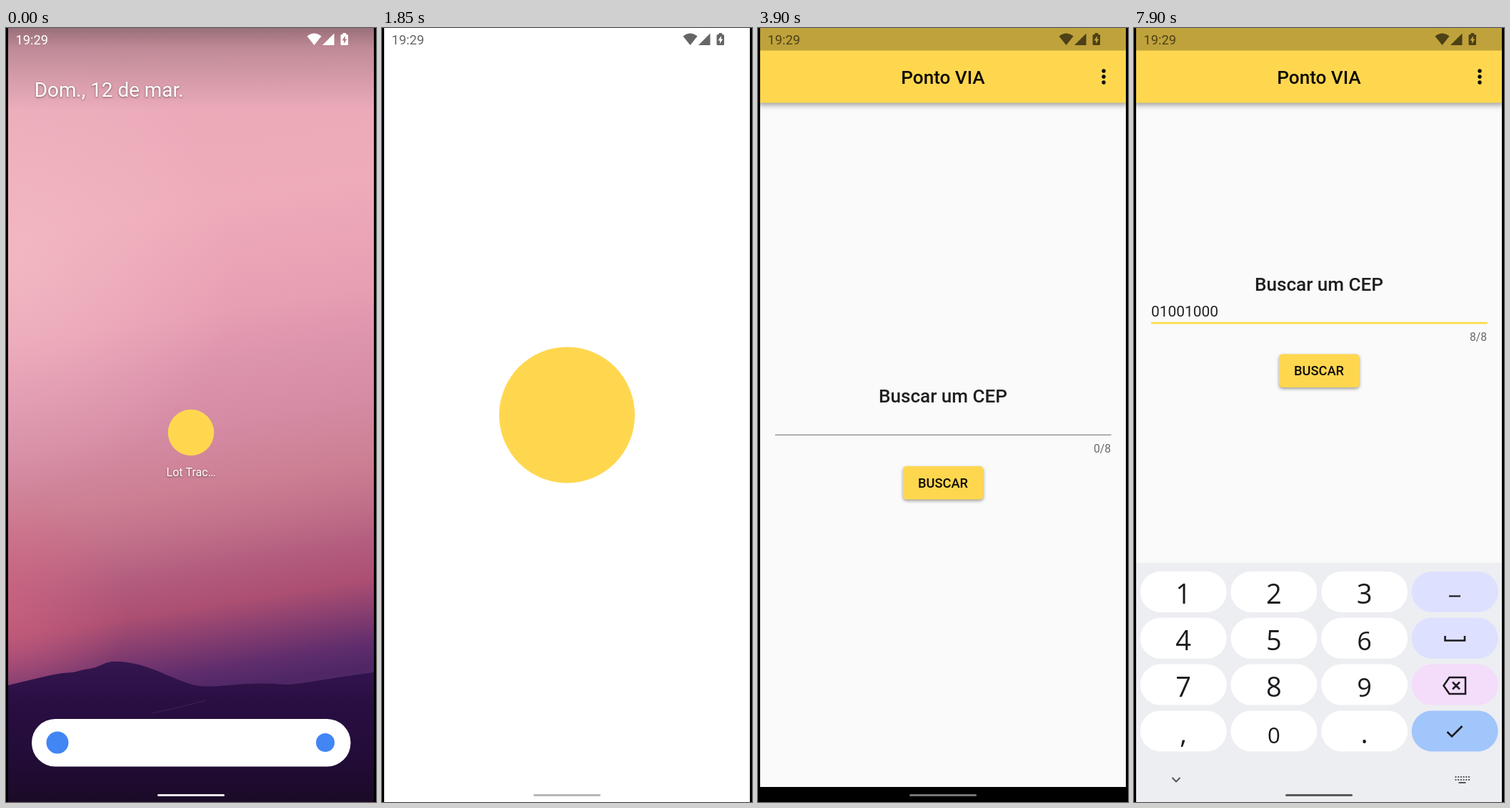
Write an HTML page with a canvas that moves like this. It is 518 px wide and 1081 px high and loops after 8 s.

```html
<!DOCTYPE html>
<html lang="pt">
<head>
<meta charset="utf-8">
<style>
html, body { margin: 0; width: 100%; height: 100%; overflow: hidden; background: #000; }
canvas { display: block; }
</style>
</head>
<body>
<canvas id="stage" width="518" height="1081"></canvas>
<script>
const c = document.getElementById('stage').getContext('2d');
const W = 518, H = 1081, CX = 259, LOOP = 8000;
const YELLOW = '#ffd74f', BLUE = '#4285f4', INK = '#1c1b1f';
const CODE = '01001000';
const KEY_TIMES = [5300, 5500, 6150, 6350, 6600, 7050, 7200, 7400];
const FOCUS = 4550;

const clamp = v => Math.max(0, Math.min(1, v));
const mix = (a, b, p) => a + (b - a) * p;
const span = (t, from, to) => clamp((t - from) / (to - from));

function bezier(x1, y1, x2, y2) {
  const at = (a, b, s) => 3 * (1 - s) ** 2 * s * a + 3 * (1 - s) * s * s * b + s ** 3;
  return x => {
    let lo = 0, hi = 1;
    for (let i = 0; i < 24; i++) {
      const m = (lo + hi) / 2;
      if (at(x1, x2, m) < x) lo = m; else hi = m;
    }
    return at(y1, y2, lo);
  };
}
const easeIn = bezier(.3, 0, .8, .15), easeTail = bezier(.05, .7, .1, 1);
const emphasized = u => u < 1 / 6 ? .4 * easeIn(u * 6) : .4 + .6 * easeTail((u - 1 / 6) * 1.2);
const slide = bezier(.2, 0, 0, 1);

function rect(x, y, w, h, r, fill) {
  c.beginPath();
  c.roundRect(x, y, w, h, r);
  c.fillStyle = fill;
  c.fill();
}
function disc(x, y, r, fill) {
  c.beginPath();
  c.arc(x, y, r, 0, 7);
  c.fillStyle = fill;
  c.fill();
}
function line(points, width, color, close) {
  c.beginPath();
  points.forEach(p => c.lineTo(...p));
  if (close) c.closePath();
  c.lineWidth = width;
  c.strokeStyle = color;
  c.stroke();
}
function text(s, x, y, size, color, align = 'left', weight = 400, family = 'Roboto') {
  c.font = `${weight} ${size}px ${family}, sans-serif`;
  c.textAlign = align;
  c.fillStyle = color;
  c.fillText(s, x, y);
}
function shadow(color, blur, dy) {
  c.shadowColor = color;
  c.shadowBlur = blur;
  c.shadowOffsetY = dy;
}
const noShadow = () => shadow('transparent', 0, 0);
function stops(gradient, list) {
  list.forEach(([at, color]) => gradient.addColorStop(at, color));
  return gradient;
}
function scaled(k, draw) {
  c.save();
  c.translate(CX, H / 2);
  c.scale(k, k);
  c.translate(-CX, -H / 2);
  draw();
  c.restore();
}

const sky = stops(c.createLinearGradient(CX, 0, 404, 907), [
  [0, '#e9a9b8'], [250, '#eeabb9'], [400, '#e79fb3'], [470, '#dd94ad'], [560, '#d48ba3'],
  [640, '#cd8094'], [700, '#c2718a'], [760, '#b25c7e'], [810, '#ac4f72'], [850, '#8b4070'],
  [900, '#602d6c'], [930, '#4f2764']
].map(([y, color]) => [y / 930, color]));
const paleGlow = stops(c.createRadialGradient(0, 330, 0, 0, 330, 320),
  [[0, 'rgba(245,192,200,.6)'], [1, 'rgba(245,192,200,0)']]);
const pinkGlow = stops(c.createRadialGradient(0, 810, 0, 0, 810, 170),
  [[0, 'rgba(212,100,128,.6)'], [1, 'rgba(212,100,128,0)']]);
const scrim = stops(c.createLinearGradient(0, 0, 0, 115),
  [[0, 'rgba(0,0,0,.34)'], [.25, 'rgba(0,0,0,.18)'], [1, 'rgba(0,0,0,0)']]);
const earth = stops(c.createLinearGradient(0, 885, 0, H),
  [[0, '#34164f'], [.3, '#290e42'], [.7, '#220c37'], [1, '#1a0a27']]);
const RIDGE = [[-20, 924], [3, 918], [40, 909], [75, 901], [95, 900], [108, 896], [125, 894], [140, 886],
  [155, 884], [185, 888], [215, 899], [240, 910], [265, 919], [290, 920], [330, 916], [375, 915],
  [395, 918], [440, 911], [485, 904], [515, 900], [540, 897]];

function wallpaper() {
  for (const g of [sky, paleGlow, pinkGlow]) {
    c.fillStyle = g;
    c.fillRect(-10, -10, W + 20, H + 20);
  }
  c.beginPath();
  c.moveTo(-20, 1100);
  c.lineTo(...RIDGE[0]);
  for (let i = 1; i < RIDGE.length - 1; i++) {
    const [x, y] = RIDGE[i], [nx, ny] = RIDGE[i + 1];
    c.quadraticCurveTo(x, y, (x + nx) / 2, (y + ny) / 2);
  }
  c.lineTo(540, 1100);
  c.fillStyle = earth;
  c.fill();
  line([[205, 957], [245, 948], [280, 939]], 1.5, 'rgba(90,50,110,.35)');
}

function home(t, p) {
  scaled(1 - .02 * p, wallpaper);
  c.fillStyle = scrim;
  c.fillRect(0, 0, W, 115);
  scaled(1 - .08 * p, () => {
    shadow('rgba(0,0,0,.45)', 3, 1);
    text('Dom., 12 de mar.', 39.7, 96, 27.9, '#fff');
    if (!p) text('Lot Trac…', CX, 626, 16, '#fff', 'center');
    noShadow();
    rect(36, 965, 446.5, 66.5, 33, '#fff');
    disc(72, 998, 15.5, BLUE);
    disc(447, 998, 13, BLUE);
  });
  if (!p) disc(CX, 565, 32.3, YELLOW);
}

function launchWindow(p) {
  const w = mix(64, 512, p), h = mix(64, H, p), y = mix(565, H / 2, p ** .75);
  rect(CX - w / 2, y - h / 2, w, h, Math.min(w / 2, 47 * (1 - p)), '#fff');
  disc(CX, y, mix(32.3, 95, p ** .75), YELLOW);
}

function app(t, lift) {
  c.fillStyle = '#fafafa';
  c.fillRect(0, 31, W, 1029);
  shadow('rgba(0,0,0,.35)', 7, 3);
  c.fillStyle = YELLOW;
  c.fillRect(0, 31, W, 73.5);
  noShadow();
  c.fillStyle = '#bfa23b';
  c.fillRect(0, 0, W, 31.5);
  text('Ponto VIA', CX, 78, 26.1, '#0c0a04', 'center', 500);
  for (const y of [60, 68, 76]) disc(484, y, 2.7, '#0c0a04');

  c.save();
  c.translate(0, -lift);
  text('Buscar um CEP', CX, 523, 26.1, '#1f1f1f', 'center', 500);
  const typed = KEY_TIMES.filter(k => k <= t).length;
  const value = CODE.slice(0, typed);
  text(value, 24, 559.5, 20.9, '#222');
  const focus = span(t, FOCUS - 100, FOCUS + 50);
  c.fillStyle = '#8a8a8a';
  c.fillRect(24, 567.7, 470.5, 1.3);
  if (focus) {
    c.globalAlpha = focus;
    c.fillStyle = '#fbdc48';
    c.fillRect(24, 567.2, 470.5, 2.7);
    c.globalAlpha = 1;
    const since = t - (typed ? KEY_TIMES[typed - 1] : FOCUS + 150);
    if (since >= 0 && since % 1000 < 500) {
      c.fillStyle = '#f5d65c';
      c.fillRect(24 + c.measureText(value).width, 542, 2.6, 20.5);
    }
  }
  text(typed + '/8', 494, 593, 15.65, '#696969', 'right');
  shadow('rgba(0,0,0,.38)', 4, 2);
  rect(203, 612, 112.5, 46.5, 5, YELLOW);
  noShadow();
  text('BUSCAR', CX, 641.5, 18.26, '#0c0a04', 'center', 500);
  c.restore();

  c.fillStyle = '#000';
  c.fillRect(0, 1060, W, 40);
}

function keyboard(t, drop) {
  c.save();
  c.translate(0, drop);
  c.fillStyle = '#edeef2';
  c.fillRect(0, 747, W, 400);
  const rows = ['123', '456', '789', ',0.'];
  const side = ['#dde0ff', '#dde0ff', '#f4dcfb', '#a1c6fb'];
  rows.forEach((row, i) => {
    const y = 759 + i * 64.8;
    [...row].forEach((d, j) => {
      const x = 8.7 + j * 126.7;
      const size = d === '0' ? 31 : '69'.includes(d) ? 36 : 38;
      rect(x, y, 121, 57, 28.5, '#fff');
      text(d, x + 60.5, y + (i === 3 ? 45.5 : 45), size, INK, 'center', 400, '"Open Sans"');
    });
    rect(388.7, y, 121, 57, 28.5, side[i]);
  });
  line([[441, 793.5], [457, 793.5]], 2.2, INK);
  line([[435.5, 849], [435.5, 855.5], [463, 855.5], [463, 849]], 2.6, INK);
  line([[441.5, 907], [464, 907], [464, 930], [441.5, 930], [433.5, 918.5]], 2.5, INK, true);
  line([[446, 913.5], [456, 923.5]], 2.5, INK);
  line([[456, 913.5], [446, 923.5]], 2.5, INK);
  line([[438.5, 983], [445, 989.5], [459.5, 975]], 2.5, INK);
  c.restore();

  c.globalAlpha = mix(.12, 1, span(t, 5000, 5600));
  if (drop < 40) {
    line([[53.5, 1047], [59, 1052.5], [64.5, 1047]], 2, '#55565a');
    c.fillStyle = '#55565a';
    for (let i = 0; i < 6; i++) {
      for (const y of [1045, 1049]) c.fillRect(449.5 + i * 3.7, y, 2, 2);
    }
    c.fillRect(454.5, 1053, 10, 2);
  }
  c.globalAlpha = 1;
}

function splash(t) {
  const u = span(t, 3390, 3730), r = 625 + (u - .32) * 1400;
  if (u === 1) return;
  const inner = `rgba(255,255,255,${1 - u})`;
  c.fillStyle = u === 0 ? '#fff' : stops(c.createRadialGradient(CX, 0, 0, CX, 0, Math.max(r, 1)),
    [[0, inner], [.85, inner], [.965, 'rgba(255,255,255,.95)'], [1, '#fff']]);
  c.fillRect(0, 0, W, H);
  c.globalAlpha = 1 - span(t, 3380, 3450);
  disc(CX, H / 2, 95, YELLOW);
  c.globalAlpha = 1;
}

function statusBar(color) {
  text('19:29', 13.5, 23, 18.3, color);
  c.beginPath();
  c.moveTo(431.5, 24);
  c.lineTo(421.5, 11.5);
  c.quadraticCurveTo(431.5, 3.5, 441.5, 11.5);
  c.fill();
  c.beginPath();
  c.moveTo(443, 24);
  c.lineTo(459.5, 24);
  c.lineTo(459.5, 7.5);
  c.fill();
  // Battery with the bolt cut out
  c.beginPath();
  c.roundRect(468.5, 9, 10.5, 15, 1.5);
  c.rect(471.5, 7, 4.5, 2);
  c.moveTo(474.8, 11);
  c.lineTo(470.5, 17.5);
  c.lineTo(473, 17.5);
  c.lineTo(473, 22);
  c.lineTo(477.2, 15.5);
  c.lineTo(474.8, 15.5);
  c.fill('evenodd');
}

function homeBar(t) {
  const keys = [[0, 238], [850, 238], [1400, 216], [3050, 94], [3600, 94], [3850, 117],
    [4600, 117], [4800, 218], [5000, 218], [5650, 90], [LOOP, 90]];
  const i = keys.findIndex(k => k[0] > t);
  const [t0, a] = keys[i - 1], [t1, b] = keys[i];
  const g = Math.round(mix(a, b, span(t, t0, t1)));
  rect(212, 1070, 94, 3, 1.5, `rgb(${g},${g},${g})`);
}

function draw(t) {
  c.fillStyle = '#fff';
  c.fillRect(0, 0, W, H);
  if (t < 1400) {
    const p = emphasized(span(t, 890, 1390));
    home(t, p);
    if (p) launchWindow(p);
    if (t >= 700 && t < 1000) {
      disc(285, 547, 14.5, 'rgba(255,255,255,.25)');
      c.lineWidth = 1;
      c.strokeStyle = 'rgba(200,190,150,.35)';
      c.stroke();
    }
  } else {
    const opened = slide(span(t, 4560, 5200)), drop = 334 * (1 - opened);
    const shift = 18 * (1 - span(t, 3400, 3700)) ** 2;
    if (t > 3390) {
      c.save();
      c.translate(0, shift);
      app(t, Math.max(0, 313 - drop) / 2);
      c.restore();
    }
    if (opened) keyboard(t, drop);
    splash(t);
  }
  statusBar(t < 1200 ? '#fff' : 'rgba(0,0,0,.6)');
  homeBar(t);
  c.fillStyle = '#000';
  c.fillRect(0, 0, 3, H);
  c.fillRect(515, 0, 3, H);
}

const start = performance.now();
(function frame() {
  draw((performance.now() - start) % LOOP);
  requestAnimationFrame(frame);
})();
</script>
</body>
</html>
```
